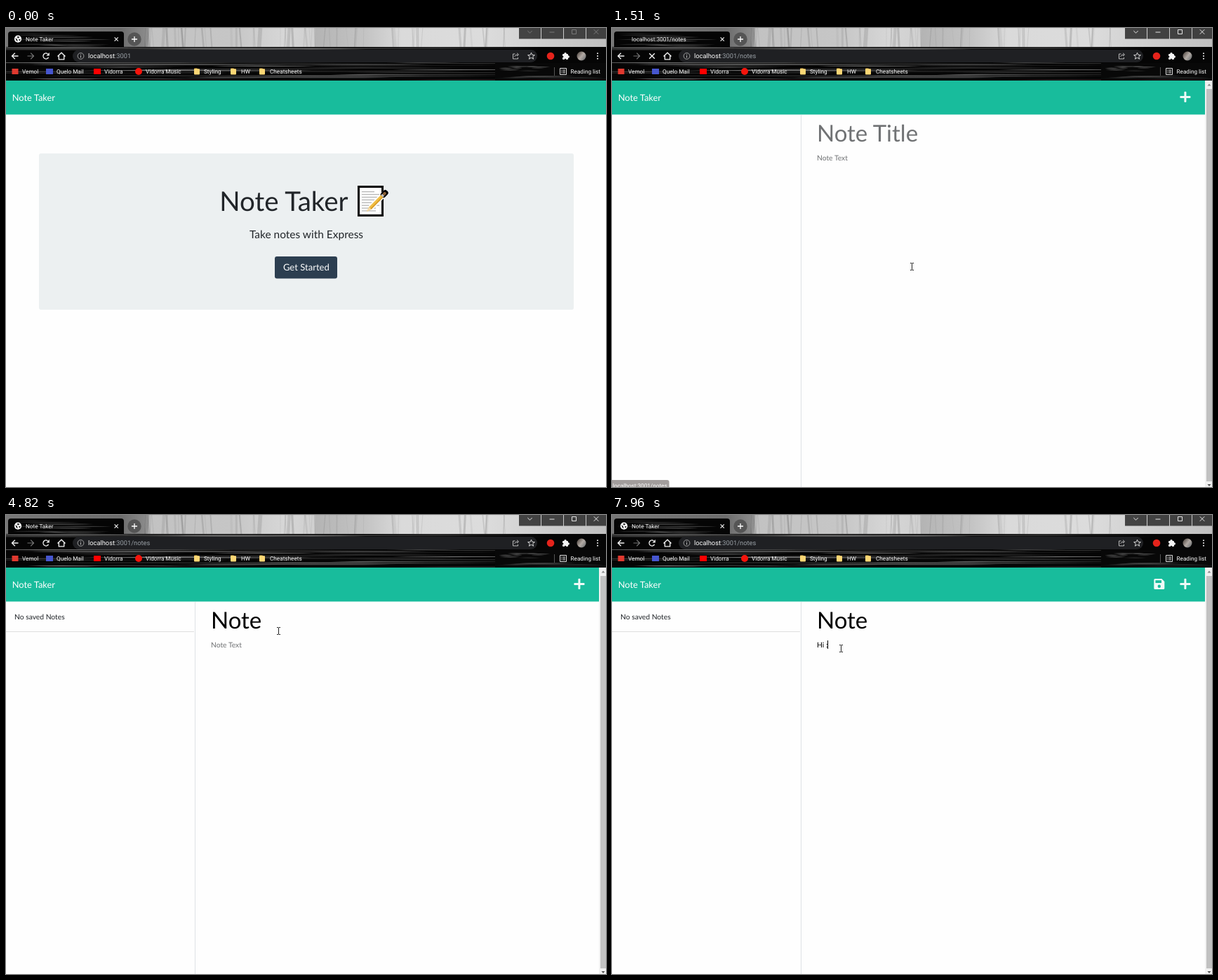
An HTML page with a canvas for the animation above (8 s loop, 855x655 px).

```html
<!DOCTYPE html>
<html lang="en">
<head>
<meta charset="utf-8">
<title>Note Taker</title>
<style>
html, body { margin: 0; width: 100%; height: 100%; overflow: hidden; background: #fefefe; }
canvas { display: block; width: 855px; height: 655px; }
</style>
</head>
<body>
<canvas id="stage" width="855" height="655"></canvas>
<script>
const W = 855, H = 655, LOOP = 8000, BLINK = 530;
const LATO = 'Lato, sans-serif', UI = 'Roboto, "Open Sans", sans-serif';
const stage = document.getElementById('stage').getContext('2d');
let c = stage;

// --- helpers ---
function setFont(size, font) {
  c.font = `${size}px ${font}`;
  c.textRendering = 'geometricPrecision';
}
function text(s, x, y, size, color, font = LATO, align = 'left') {
  setFont(size, font);
  c.textAlign = align;
  c.fillStyle = color;
  c.fillText(s, x, y);
}
function widthOf(s, size, font = LATO) {
  setFont(size, font);
  return c.measureText(s).width;
}
function rect(x, y, w, h, color, r = 0) {
  c.fillStyle = color;
  c.beginPath();
  c.roundRect(x, y, w, h, r);
  c.fill();
}
function disc(x, y, r, color) {
  c.fillStyle = color;
  c.beginPath();
  c.arc(x, y, r, 0, 7);
  c.fill();
}
function ring(x, y, r, color, lw = 1, a = 0, b = Math.PI * 2) {
  c.strokeStyle = color;
  c.lineWidth = lw;
  c.beginPath();
  c.arc(x, y, r, a, b);
  c.stroke();
}
function draw(d, x, y, { fill, stroke, lw = 1 }) {
  const p = new Path2D(d);
  c.save();
  c.translate(x, y);
  if (fill) { c.fillStyle = fill; c.fill(p); }
  if (stroke) { c.strokeStyle = stroke; c.lineWidth = lw; c.stroke(p); }
  c.restore();
}
function random(seed) {
  return () => (seed = (seed * 16807) % 2147483647) / 2147483647;
}

// --- browser theme, painted once ---
function streak(x, y, w, h, g) {
  c.fillStyle = `rgb(${g},${g},${g})`;
  c.beginPath();
  c.moveTo(x, y);
  c.quadraticCurveTo(x + w * .4, y - h, x + w, y);
  c.quadraticCurveTo(x + w * .6, y + h, x, y);
  c.fill();
}
function forest() {
  const g = c.createLinearGradient(0, 0, W, 0);
  [[0, '#777'], [.19, '#6c6c6c'], [.232, '#8a8a8a'], [.234, '#c2c2c2'], [.38, '#c6c6c6'], [.46, '#d6d6d6'],
   [.514, '#d0d0d0'], [.516, '#b4b4b4'], [.6, '#c4c4c4'], [.66, '#dadada'], [.8, '#dcdcdc'], [1, '#c0c0c0']]
    .forEach(([p, k]) => g.addColorStop(p, k));
  c.fillStyle = g;
  c.fillRect(0, 0, W, 28);
  const r = random(71);
  for (let i = 0; i < 60; i++) {
    const x = 200 + r() ** 1.6 * 530, lean = (r() - .5) * 6;
    c.strokeStyle = `rgba(70,70,70,${.05 + r() * .17})`;
    c.lineWidth = .5 + r() * r() * 6;
    c.beginPath();
    c.moveTo(x, 0);
    c.lineTo(x + lean, 28);
    c.stroke();
  }
}
function marble() {
  rect(0, 27, W, 48, '#050505');
  rect(3, 5, 165, 24, '#050505', [4, 4, 0, 0]);
  const r = random(2024), bands = [[28, 4], [49, 7], [66, 8], [56, 12]];
  for (let i = 0; i < 90; i++) {
    const [y, h] = bands[i % 4];
    streak(r() * 650 - 80, y + r() * h, 90 + r() * 260, .5 + r() * .9, 30 + r() ** 2 * 100);
  }
  for (let i = 0; i < 14; i++) streak(4 + r() * 60, 7 + r() * 19, 40 + r() * 55, .9, 30 + r() * 75);
  rect(697, 50, 158, 25, '#080808');
  for (let i = 0; i < 9; i++) streak(699 + r() * 50, 55 + r() * 7, 12 + r() * 20, 1.4, 45 + r() * 40);
  for (let i = 0; i < 10; i++) streak(697 + r() * 100, 67 + r() * 7, 40 + r() * 60, .8, 30 + r() * 50);
}
function folder(x) {
  rect(x, 57.5, 5, 4, '#e7b94f', 1);
  rect(x, 58.3, 8, 8.2, '#fbd775', 1);
}
function toolbar() {
  const white = '#f4f4f4', line = { stroke: white, lw: 1.35 };
  rect(95, 31, 662, 18, '#1f2023', 9);
  draw('M9 0H0M4.3-4.3L0 0L4.3 4.3', 8.5, 40, line);
  draw('M0 0H9M4.7-4.3L9 0L4.7 4.3', 30.5, 40, { stroke: '#777', lw: 1.2 });
  draw('M-5.5 .5L0-4.8L5.5 .5M-3.7-.5V4.8H3.7V-.5', 79, 40, line);
  ring(106.5, 40, 4.4, '#aaa', .9);
  rect(106, 39.3, 1, 3.2, '#bbb');
  rect(106, 37.3, 1, 1, '#bbb');
  draw('M-1-3H-4V4H3V2M-2 1Q-1-2 3-2M1.5-4.2L4-2L1.5 .2', 726.5, 40, { stroke: '#ccc', lw: .9 });
  draw('M0-4.8L1.4-1.5L4.9-1.3L2.2 .9L3.1 4.3L0 2.4L-3.1 4.3L-2.2 .9L-4.9-1.3L-1.4-1.5Z', 748.5, 40, { stroke: '#ddd', lw: .95 });
  disc(776, 40, 5.3, '#e5231b');
  rect(793, 37, 8, 8, white, 1);
  disc(797, 36.8, 1.7, white);
  disc(801.3, 41, 1.7, white);
  disc(793.2, 41, 1.2, '#111');
  disc(797, 45, 1.2, '#111');
  const g = c.createLinearGradient(813, 35, 827, 46);
  g.addColorStop(0, '#4a4039');
  g.addColorStop(.5, '#b2aaa4');
  g.addColorStop(1, '#5e6468');
  disc(820, 40, 6.5, g);
  for (const y of [36.2, 40, 43.8]) disc(843, y, 1, white);

  const mark = (s, x) => text(s, x, 64.8, 8.2, '#fff', UI);
  rect(8.5, 58, 9, 8, '#e0392f');
  mark('Vemol', 23);
  rect(57, 58, 10, 8, '#4656cf');
  mark('Quelo Mail', 72);
  rect(125, 58, 10, 8, '#f00');
  mark('Vidorra', 140);
  disc(189, 62, 5, '#f5140c');
  mark('Vidorra Music', 199);
  folder(268);
  mark('Styling', 282);
  folder(320);
  mark('HW', 335);
  folder(361);
  mark('Cheatsheets', 376);
  rect(781, 56, 1, 12, '#555');
  draw('M-4.5-4.5H4.5V4.5H-4.5ZM-2.7-2H-1.5M-.5-2H2.8M-2.7 0H-1.5M-.5 0H2.8M-2.7 2H-1.5M-.5 2H2.8', 794, 62, { stroke: '#ddd', lw: 1 });
  mark('Reading list', 804.5);
}
function paintChrome() {
  const layer = document.createElement('canvas');
  layer.width = W;
  layer.height = 75;
  c = layer.getContext('2d');
  forest();
  marble();
  disc(183, 16, 9.7, '#555');
  draw('M-4 0H4M0-4V4', 183, 16, { stroke: '#fff', lw: 1.3 });
  draw('M-2.6-2.6L2.6 2.6M2.6-2.6L-2.6 2.6', 157.2, 16, { stroke: '#eee', lw: 1.2 });
  for (const x of [731, 763, 795, 827]) rect(x, 0, 31, 15.5, 'rgba(40,40,40,.84)');
  toolbar();
  c = stage;
  return layer;
}
const chrome = paintChrome();

// --- changing parts of the browser ---
function browser(t) {
  const notes = t >= 1510, loading = notes && t < 1570;
  c.drawImage(chrome, 0, 0);

  const k = { stroke: t >= 1370 ? '#eee' : '#7c7c7c', lw: .95 };
  draw('M-3.2-1.5L0 1.7L3.2-1.5', 746.5, 5.5, k);
  draw('M-3.5 0H3.5', 778, 6, k);
  draw('M-3-3H3V3H-3Z', 809.5, 5.5, k);
  draw('M-3.3-3.3L3.3 3.3M3.3-3.3L-3.3 3.3', 841, 5.5, k);

  if (loading) {
    draw('M-3.8-3.8L3.8 3.8M3.8-3.8L-3.8 3.8', 57, 40, { stroke: '#f4f4f4', lw: 1.4 });
  } else {
    disc(17, 15.7, 5.1, '#fff');
    draw('M-4-1.5L-1 0L-.3 3.6L-2.4 2.4L-3 .3ZM-1-3.8L2.3-3.2L1.2-1.2L-.8-1.4ZM1 .2L3.8 .4L2.2 3.2Z', 17, 15.7, { fill: '#222' });
    ring(57, 40, 4, '#f4f4f4', 1.4, .5, 5.4);
    draw('M4.8-5V-.6H.4Z', 57, 40, { fill: '#f4f4f4' });
  }
  text(loading ? 'localhost:3001/notes' : 'Note Taker', 28, 18.7, 8.2, '#fff', UI);
  text('localhost', 117, 43.3, 9.3, '#fff', UI);
  text(notes ? ':3001/notes' : ':3001', 117 + widthOf('localhost', 9.3, UI), 43.3, 9.3, '#9aa0a6', UI);
}
function statusBubble(t) {
  if (t < 1160 || t >= 1570) return;
  rect(-2, 645, 83.5, 12, t < 1510 ? '#777170' : '#a29d9c', [0, 3, 0, 0]);
  text('localhost:3001/notes', 1, 655.6, 8.2, '#fff', UI);
}

// --- pages ---
function navbar(w) {
  rect(0, 75, w, 48.6, '#18bc9c');
  text('Note Taker', 8.7, 103.6, 12.89, '#fff');
}
function memo(x, y) {
  rect(x + 1.5, y + 1.5, 34, 41, '#fff');
  c.strokeStyle = '#000';
  c.lineWidth = 3;
  c.strokeRect(x + 1.5, y + 1.5, 34, 41);
  for (let i = 0; i < 8; i++) rect(x + 6, y + 8 + i * 3.9, i < 1 ? 18 : 25 - (i > 5 ? 5 : 0), 1.3, '#b5b5b5');
  c.save();
  c.translate(x + 13, y + 37);
  c.rotate(-.79);
  rect(7, -4, 33, 8, '#fff', 3);
  rect(30, -4, 11.5, 8, '#000', 3.5);
  draw('M0 0L7-2.3H31V2.3H7Z', 0, 0, { fill: '#f0be45' });
  draw('M0 0L7-2.3V2.3Z', 0, 0, { fill: '#f3d9a8' });
  rect(7, .6, 24, 1.7, '#d99b28');
  rect(31, -2, 2.5, 4, '#c9c9c9');
  rect(33.5, -2, 5, 4, '#8c6239', 1.5);
  c.restore();
}
function home(t) {
  navbar(W);
  rect(47, 179, 762, 223, '#ecf0f1', 3);
  text('Note Taker', 304.3, 261, 38.5, '#212529');
  memo(501, 225);
  text('Take notes with Express', 428, 300, 15.47, '#212529', LATO, 'center');
  const h = Math.min(1, Math.max(0, (t - 1090) / 150));
  const mix = (a, b) => Math.round(a + (b - a) * h);
  rect(383, 326, 89, 31.5, `rgb(${mix(44, 29)},${mix(62, 41)},${mix(80, 53)})`, 3);
  text('Get Started', 427.8, 346.3, 13.05, '#fff', LATO, 'center');
}

// time, field, value
const edits = [
  [2620, 'title', ''], [3680, 'title', 'N'], [3880, 'title', 'No'], [4150, 'title', 'Not'], [4220, 'title', 'Note'],
  [5430, 'body', ''], [6220, 'body', 'H'], [6420, 'body', 'Hi'], [7150, 'body', 'Hi '], [7960, 'body', 'Hi :']
];
const fields = {
  title: { hint: 'Note Title', size: 33, base: 162, top: 133, high: 34 },
  body: { hint: 'Note Text', size: 10.31, base: 188.7, top: 179, high: 12 }
};
const LEFT = 292;

function notes(t) {
  navbar(845);
  const icon = '#eefaf7';
  rect(809.3, 97, 15.2, 3, icon, 1);
  rect(815.4, 90.8, 3, 15.2, icon, 1);
  if (t >= 6220) {
    draw('M1.5 0H11L15 4V13.5Q15 15 13.5 15H1.5Q0 15 0 13.5V1.5Q0 0 1.5 0Z', 772.3, 91, { fill: icon });
    rect(774.4, 93.2, 8.6, 3.8, '#18bc9c');
    disc(779.8, 101.8, 2.2, '#18bc9c');
  }
  rect(269, 124, 1, 531, '#dfe2e5');
  if (t >= 1570) {
    text('No saved Notes', 12, 149, 10.31, '#212529');
    rect(0, 166, 268, 1, '#dfdfdf');
  }

  const values = { title: '', body: '' };
  let last = null;
  for (const e of edits) if (t >= e[0]) { values[e[1]] = e[2]; last = e; }
  for (const id in fields) {
    const f = fields[id], v = values[id];
    text(v || f.hint, LEFT, f.base, f.size, v ? '#000' : '#707274');
  }
  if (last && (t - last[0]) % (2 * BLINK) < BLINK) {
    const f = fields[last[1]];
    rect(Math.floor(LEFT + widthOf(last[2], f.size)), f.top, 1, f.high, '#000');
  }

  rect(845, 75, 10, 580, '#f1f1f1');
  rect(847, 87, 8, 560, '#c1c1c1');
  draw('M-2.5 1.5L0-1.5L2.5 1.5Z', 851, 81, { fill: '#8a8a8a' });
  draw('M-2.5-1.5L0 1.5L2.5-1.5Z', 851, 652.5, { fill: '#505050' });
}

// --- mouse: runs of time, x, y, moved in small hops ---
const runs = [
  [[190, 830, 645], [470, 620, 480], [750, 460, 385], [960, 425, 360]],
  [[1090, 426, 352], [1230, 426.5, 339.5]],
  [[1510, 427, 340], [1510, 427, 340]],
  [[1770, 418, 335], [1980, 67, 232], [2200, 285.5, 166.5], [2550, 386, 165]],
  [[2620, 389, 164], [2620, 389, 164]],
  [[4820, 388, 165], [5150, 345, 186], [5350, 327, 191], [5500, 326, 190]]
];
function mouseAt(t) {
  const run = runs.filter(r => t >= r[0][0]).pop();
  if (!run) return null;
  const start = run[0][0], end = run[run.length - 1];
  if (t >= end[0]) return end;
  const n = Math.max(1, Math.round((end[0] - start) / 70)), hop = (end[0] - start) / n;
  const q = start + Math.floor((t - start) / hop + .01) * hop;
  const i = run.findIndex(p => p[0] > q), a = run[i - 1], b = run[i];
  const k = (q - a[0]) / (b[0] - a[0]);
  return [q, a[1] + (b[1] - a[1]) * k, a[2] + (b[2] - a[2]) * k];
}
function mouse(t) {
  const m = mouseAt(t);
  if (!m) return;
  const [, x, y] = m;
  if (t >= 1510 && x > 290) {
    draw('M-2.5-5H-.7L0-4.5L.7-5H2.5M0-4.5V4.5M-2.5 5H-.7L0 4.5L.7 5H2.5', Math.round(x) + .5, Math.round(y) + .5, { stroke: '#222', lw: 1 });
  } else {
    draw('M0 0V10.8L2.5 8.5L4.2 12.2L6 11.4L4.4 7.8H7.8Z', x, y, { fill: '#fff', stroke: '#111', lw: .85 });
  }
}

function frame() {
  const t = performance.now() % LOOP;
  rect(0, 0, W, H, '#fefefe');
  if (t < 1510) home(t); else notes(t);
  browser(t);
  statusBubble(t);
  mouse(t);
  requestAnimationFrame(frame);
}
frame();
</script>
</body>
</html>
```
